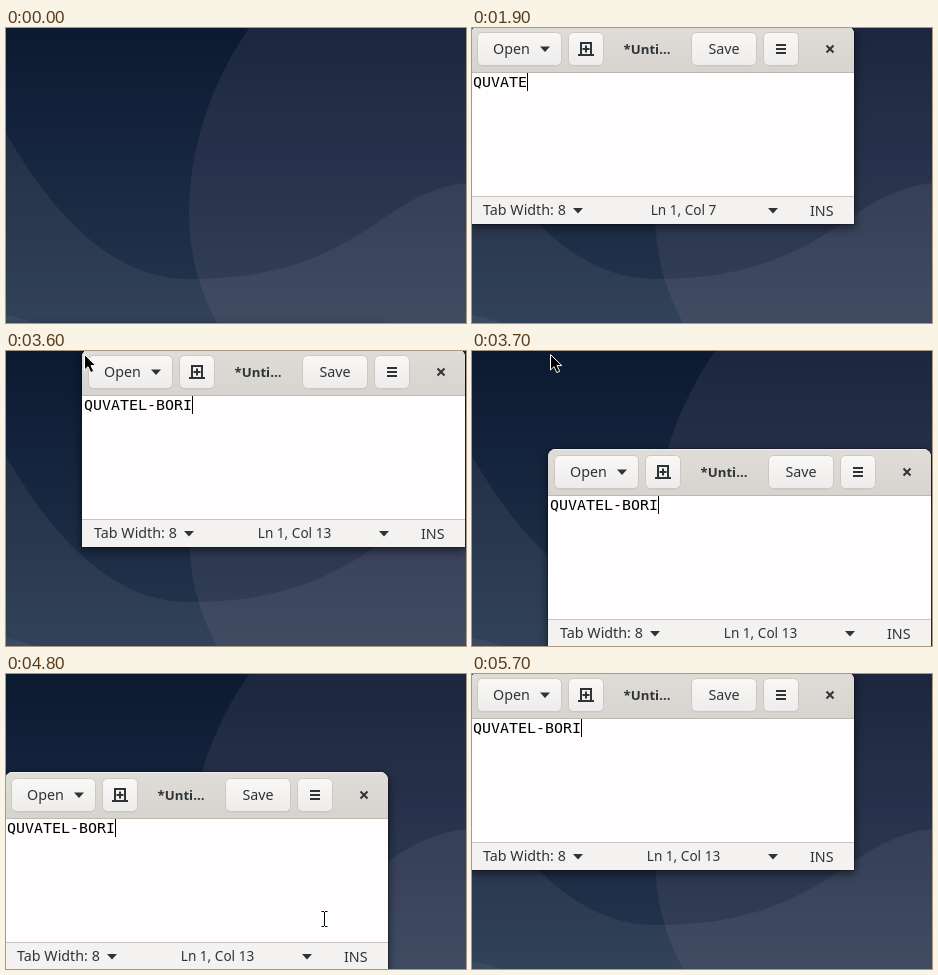
An HTML page that plays this animation: 460x295 px, repeating every 5900 ms.

```html
<!DOCTYPE html>
<html lang="en">
<head>
<meta charset="utf-8">
<title>Scripted text editor</title>
<style>
  html, body { margin: 0; width: 100%; height: 100%; overflow: hidden; }
  #stage { position: relative; width: 460px; height: 295px; overflow: hidden; background: #14233d; }
  svg { display: block; }
  #desk, #pointer { position: absolute; left: 0; top: 0; }
  #win {
    position: absolute; left: -1px; top: -2px; width: 383px; height: 198px;
    border-radius: 8px 8px 0 0;
    box-shadow: 0 3px 9px 1px rgba(0,0,0,.5), 0 0 0 1px rgba(0,0,0,.23);
  }
  #win svg { border-radius: 8px 8px 0 0; }
  text { font: 14.3px "Noto Sans", "Open Sans", sans-serif; fill: #2e3436; }
  .mid { text-anchor: middle; }
  #title { font-size: 13.2px; font-weight: 700; }
  #place { font-size: 13.6px; }
  #typed { font: 14.95px "DejaVu Sans Mono", monospace; fill: #000; white-space: pre; }
  .btn { fill: url(#face); stroke: #cdc7c2; }
  .icon { fill: #2e3436; }
  .line { fill: none; stroke: #2e3436; stroke-width: 2; }
</style>
</head>
<body>
<div id="stage">
  <svg id="desk" width="460" height="295">
    <defs>
      <linearGradient id="sky" x1="0" y1="0" x2="0" y2="1">
        <stop offset="0" stop-color="#0b1a31"/>
        <stop offset=".45" stop-color="#17263f"/>
        <stop offset="1" stop-color="#25364e"/>
      </linearGradient>
    </defs>
    <rect width="460" height="295" fill="url(#sky)"/>
    <path d="M0 105C50 192 110 251 183 251C270 251 320 230 375 192C405 171 430 158 460 155V295H0Z" fill="#fff" fill-opacity=".06"/>
    <path d="M243 0C205 55 183 120 183 185C183 225 193 262 211 295H460V0Z" fill="#ffc8dc" fill-opacity=".07"/>
    <path d="M0 287Q16 290 30 295H0Z" fill="#fff" fill-opacity=".05"/>
  </svg>

  <div id="win">
    <svg width="383" height="198" viewBox="-1 -2 383 198">
      <defs>
        <linearGradient id="bar" x1="0" y1="0" x2="0" y2="1">
          <stop offset="0" stop-color="#e0ddd9"/>
          <stop offset="1" stop-color="#d7d4cf"/>
        </linearGradient>
        <linearGradient id="face" x1="0" y1="0" x2="0" y2="1">
          <stop offset="0" stop-color="#f9f8f7"/>
          <stop offset="1" stop-color="#eeecea"/>
        </linearGradient>
      </defs>
      <rect x="-1" y="-2" width="383" height="198" fill="#fffdfe"/>
      <rect x="-1" y="-2" width="383" height="46" fill="url(#bar)"/>
      <rect x="-1" y="-2" width="383" height="1" fill="#f0eeec"/>
      <rect x="-1" y="44" width="383" height="1" fill="#bfb8b1"/>

      <g id="buttons"></g>
      <text class="mid" x="39.5" y="26">Open</text>
      <path class="icon" d="M68 18.5h10l-5 5.5z"/>
      <path class="line" d="M109 26.5V15H119V26.5M106 27H122M114 17.5V24.5M110.5 21H117.5"/>
      <text class="mid" id="title" x="175" y="26"></text>
      <text class="mid" x="252" y="26">Save</text>
      <path class="line" d="M304 17H314M304 21H314M304 25H314"/>
      <path class="line" d="M354.5 17.5l7 7m0-7l-7 7"/>

      <text id="typed" x="1" y="59"></text>
      <rect id="caret" y="45" width="1" height="18"/>

      <rect x="-1" y="168" width="383" height="28" fill="#f4f2f1"/>
      <rect x="-1" y="168" width="383" height="1" fill="#c8c4c0"/>
      <text x="11" y="187">Tab Width: 8</text>
      <path class="icon" d="M101 180h10l-5 5.5zM296 180h10l-5 5.5z"/>
      <text class="mid" id="place" x="211.5" y="187"></text>
      <text x="338" y="188">INS</text>
    </svg>
  </div>

  <svg id="pointer" width="460" height="295">
    <path id="arrow" d="M.5 .5V16L4 12.7L6.8 18.6L9.7 17.3L7 11.6H11.8Z" fill="#000" stroke="#fff"/>
    <g id="beam" fill="none">
      <path d="M-2.5-5.5H3.5M.5-5V9M-2.5 9.5H3.5" stroke="#fff" stroke-width="3"/>
      <path d="M-2.5-5.5H0M1-5.5H3.5M.5-5V9M-2.5 9.5H0M1 9.5H3.5" stroke="#000"/>
    </g>
  </svg>
</div>

<script>
  const LOOP = 5900;
  const WORD = "QUVATEL-BORI";
  const $ = id => document.getElementById(id);

  // [time, value] steps; each value holds until the next step
  const typing = [[0, 0], [1200, 2], [1400, 3], [1600, 4], [1700, 5], [1900, 6], [2000, 7],
                  [2200, 8], [2300, 9], [2500, 10], [2700, 11], [2800, 12]];
  const winX = [[0, 0], [3100, 77], [4300, 0]];
  const winY = [[0, 298], [900, 0], [3700, 100], [4900, 0]];
  const caretOn = [[0, 0], [1200, 1], [4200, 0], [4600, 1], [5300, 0], [5700, 1]];
  const mouse = { from: 3600, to: 5100, every: 200, step: 40, x: 78, y: 3 };

  const at = (steps, t) => steps.filter(s => s[0] <= t).pop()[1];
  const show = (id, on) => $(id).setAttribute("visibility", on ? "visible" : "hidden");

  $("buttons").innerHTML = [[5, 84], [96, 35], [219, 65], [291, 35]].map(([x, w]) =>
    `<rect x="${x + .5}" y="5.5" width="${w}" height="33" rx="5" fill="#000" fill-opacity=".07"/>` +
    `<rect class="btn" x="${x + .5}" y="4.5" width="${w}" height="33" rx="5"/>`).join("");

  function draw(t) {
    const n = at(typing, t);
    $("win").style.transform = `translate(${at(winX, t)}px, ${at(winY, t)}px)`;
    $("title").textContent = n ? "*Unti…" : "Untitl…";
    $("typed").textContent = WORD.slice(0, n);
    $("place").textContent = `Ln 1, Col ${n + 1}`;
    $("caret").setAttribute("x", 1 + 9 * n);
    show("caret", at(caretOn, t));

    const active = t >= mouse.from && t < mouse.to;
    const move = Math.floor((t - mouse.from) / mouse.every) * mouse.step;
    const overText = t >= 4400;
    show("arrow", active && !overText);
    show("beam", active && overText);
    for (const id of ["arrow", "beam"])
      $(id).setAttribute("transform", `translate(${mouse.x + move} ${mouse.y + move})`);
  }

  const start = performance.now();
  function tick() {
    draw((performance.now() - start) % LOOP);
    requestAnimationFrame(tick);
  }
  tick();
</script>
</body>
</html>
```
